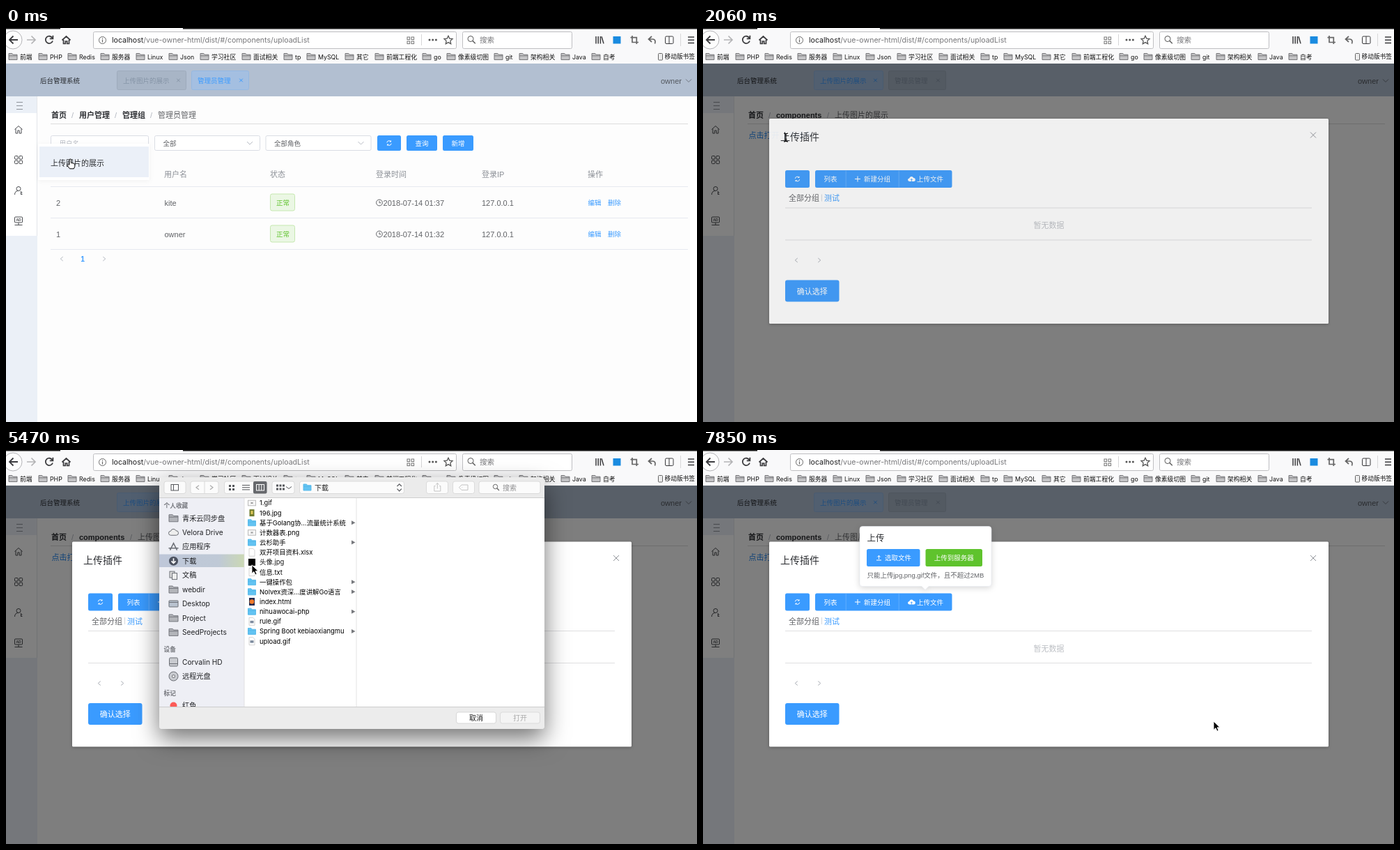
An HTML page that plays this animation: 992x565 px, repeating every 8000 ms.

```html
<!DOCTYPE html>
<html lang="zh-CN">
<head>
<meta charset="utf-8">
<title>后台管理系统</title>
<style>
  html, body { margin: 0; width: 100%; height: 100%; overflow: hidden; background: #fdfdfd; }
  svg { display: block; }
  text { white-space: pre; }
  .page { font-family: "Liberation Sans", "Noto Sans CJK SC", "Noto Sans CJK", sans-serif; }
  .ui { font-family: Inter, "Noto Sans CJK SC", "Noto Sans CJK", sans-serif; }
  #sheetBack { filter: drop-shadow(0 14px 17px rgba(0, 0, 0, .55)); }
  #dialogBack { filter: drop-shadow(0 1px 2px rgba(0, 0, 0, .3)); }
  #popBack { filter: drop-shadow(0 2px 4px rgba(0, 0, 0, .16)); }
  #menuBack { filter: drop-shadow(0 1px 3px rgba(0, 0, 0, .05)); }
</style>
</head>
<body>
<svg id="stage" width="992" height="565" viewBox="0 0 992 565"></svg>
<script>
const LOOP = 8000, BLUE = '#3a9bff', HOVER = '#66b1ff', GREEN = '#5fc32d';
const $ = id => document.getElementById(id);

// Drawing helpers; y of a text is its middle line.
const R = (x, y, w, h, fill, r = 0, stroke = 'none', extra = '') =>
  `<rect x="${x}" y="${y}" width="${w}" height="${h}" rx="${r}" fill="${fill}" stroke="${stroke}" ${extra}/>`;
const C = (x, y, r, fill, stroke = 'none') => `<circle cx="${x}" cy="${y}" r="${r}" fill="${fill}" stroke="${stroke}"/>`;
const P = (d, stroke = '#555', w = 1, fill = 'none', extra = '') =>
  `<path d="${d}" stroke="${stroke}" stroke-width="${w}" fill="${fill}" ${extra}/>`;
const T = (x, y, s, size = 11, fill = '#606266', weight = 400, anchor = 'start') =>
  `<text x="${x}" y="${y + size * .37}" font-size="${size}" fill="${fill}" font-weight="${weight}" text-anchor="${anchor}">${s}</text>`;
const G = (id, body, attr = '') => `<g id="${id}" ${attr}>${body}</g>`;
const at = (x, y, body) => `<g transform="translate(${x} ${y})">${body}</g>`;
const line = (x1, x2, y, c) => P(`M${x1} ${y}H${x2}`, c);
const cross = (x, y, r, c) => P(`M${x - r} ${y - r}l${2 * r} ${2 * r}m0 ${-2 * r}l${-2 * r} ${2 * r}`, c);
const chevron = (x, y, dx, dy, c, w = 1) => dx
  ? P(`M${x - dx / 2} ${y - 3}l${dx} 3l${-dx} 3`, c, w)
  : P(`M${x - 4} ${y - dy / 2}l4 ${dy}l4 ${-dy}`, c, w);
const refresh = (x, y, c, r = 3.2, w = 1) =>
  P(`M${x - r} ${y - .6}a${r} ${r} 0 0 1 ${1.8 * r} -1.4v-1.6m0 1.6h-1.8M${x + r} ${y + .6}a${r} ${r} 0 0 1 ${-1.8 * r} 1.4v1.6m0 -1.6h1.8`, c, w);
const magnifier = (x, y, r, c) => C(x, y, r, 'none', c) + P(`M${x + r * .7} ${y + r * .7}l${r} ${r}`, c, 1.3);
const folder = (x, y, w, h, fill, stroke) =>
  P(`M${x} ${y + h}v${-h}h${w * .4}l1.5 1.7h${w * .6 - 1.5}v${h - 1.7}zM${x} ${y + 3.4}h${w}`, stroke, .9, fill);

function browser() {
  const ink = '#3c3c3f';
  const marks = [[4, '前端'], [47, 'PHP'], [89, 'Redis'], [136, '服务器'], [187, 'Linux'], [234, 'Json'], [279, '学习社区'],
    [339, '面试相关'], [399, 'tp'], [432, 'MySQL'], [487, '其它'], [530, '前端工程化'], [598, 'go'], [633, '像素级切图'],
    [701, 'git'], [737, '架构相关'], [797, 'Java'], [841, '自考']];
  return R(0, 0, 992, 51, '#f9f9fa') + R(0, 0, 78, 1.5, '#111') + R(254, 0, 738, 1.5, '#111') +
    C(10, 17, 13, '#fdfdfd', '#b5b5b8') + P('M17 17H5m5.5-5.5L5 17l5.5 5.5', ink, 1.8) +
    P('M30 17h12m-5.5-5.5L42 17l-5.5 5.5', '#b4b4b6', 1.7) +
    P('M66.5 14.2A5.2 5.2 0 1 0 67 18.5M67.4 10.8v4.6h-4.6', ink, 1.8) +
    P('M80.5 17.5l6-5.5 6 5.5M82.5 17v5.5h2.8v-3.5h2.4v3.5h2.8V17', ink, 1.7) +
    R(125.5, 5.5, 521, 24, '#fff', 2, '#bfbfc2') + C(138.5, 17.5, 5, 'none', '#666') + P('M138.5 16.5v4m0-6.2v1.3', '#666', 1.2) +
    T(152, 17.5, 'localhost<tspan fill="#77777a">/vue-owner-html/dist/#/components/uploadList</tspan>', 10.6, '#1c1c1e') +
    [[576, 13], [582, 13], [576, 19], [582, 19]].map(p => R(...p, 3.6, 3.6, 'none', 0, '#777')).join('') +
    P('M596.5 9v16', '#d5d5d7') + [608, 612.7, 617.4].map(x => C(x, 17, 1.5, '#555')).join('') +
    P('M635 11.2l1.8 3.9 4.2.5-3.1 2.9.8 4.2-3.7-2.1-3.7 2.1.8-4.2-3.1-2.9 4.2-.5z', '#555', 1.3) +
    R(655.5, 5.5, 157, 24, '#fff', 2, '#bfbfc2') + magnifier(667, 15.5, 4, '#555') + T(680, 17.5, '搜索', 10.6, '#77777a') +
    P('M847 12v10.5m3.2-10.5v10.5m3.2-10.5v10.5M855 12.2l3 10.2', ink, 1.5) + R(871.5, 12, 11, 10.5, '#1a8be0') +
    P('M899 11v9.5h9M896.5 13.7h8.8V23', '#666', 1.7) + P('M927 12l-4.5 4 4.5 4m-4.5-4h6c4 0 4 4 3 6.5', '#666', 1.7) +
    R(946.5, 12, 11.5, 10.5, 'none', 1.5, ink) + P('M952 12v10.5', ink) + P('M968.5 8v18', '#d8d8da') +
    P('M979 13h9m-9 4.3h9m-9 4.3h9', ink, 1.5) +
    marks.map(([x, s]) => folder(x, 36.5, 12, 9, '#c4c4c6', '#6c6c70') + T(x + 16, 41.3, s, 8.8, '#111')).join('') +
    R(936.5, 36.5, 6, 9.5, '#eee', 1, '#666') + T(945.5, 41, '移动版书签', 8.7, '#111');
}

function tab(x, w, s, on) {
  const c = on ? BLUE : '#8594a6';
  return R(x + .5, 61.5, w, 27, on ? '#a4bfe1' : '#a8b5c6', 2, on ? '#94b8e2' : '#9eabbc') +
    T(x + 9, 75, s, 9.5, c) + cross(x + w - 10.5, 75, 2.3, c);
}

function frame() {
  const ink = '#4a4c50';
  const tabs = on => tab(159, 99, '上传图片的展示', on) + tab(266, 82, '管理员管理', !on);
  return R(0, 51, 992, 47, '#b2bfd1') + T(49, 75, '后台管理系统', 9.5, '#25282c') +
    G('tabsOld', tabs(false)) + G('tabsNew', tabs(true)) +
    T(940, 75.5, 'owner', 11, '#53585f') + chevron(980, 75.5, 0, 4, '#6f7680') +
    R(0, 98, 45, 467, '#ebf0f7') + R(0, 122, 44, 176, '#fff') + P('M44.5 98v200', '#e3e6ea') +
    P('M15 106.5h9m-9 5h9m-9 5h9', '#8d9299') +
    P('M12.5 145.5l5.5-5 5.5 5M14 144.5v6.5h2.8v-4h2.4v4h2.8v-6.5', ink) +
    [[12.5, 183.5], [19, 183.5], [12.5, 190], [19, 190]].map(p => R(...p, 4.6, 4.6, 'none', 1, ink)).join('') +
    C(18, 230.5, 3, 'none', ink) + P('M12.5 239c0-3.5 2.2-5.5 5-5.5M21.5 234v5m0-3h2m-2 2.5h2', ink) +
    R(12.5, 271, 11, 8, 'none', 1, ink) + T(18, 275, 'AD', 5, ink, 700, 'middle') + P('M18 279v3.5m-5.5 0h11', ink);
}

function crumbs(list) {
  return list.map(([x, s], i) => {
    const last = i === list.length - 1;
    return T(x, 124.5, s, 11, last ? '#606266' : '#2d2f33', last ? 400 : 700) +
      (last ? '' : T(list[i + 1][0] - 11, 124.5, '/', 11, '#b0b5be'));
  }).join('') + line(64, 979, 137.5, '#dcdcdc');
}

function userPage() {
  const field = (x, w, s, c, arrow) => R(x + .5, 154.5, w, 21, '#fff', 2, '#dadde4') + T(x + 12.5, 165.5, s, 9.5, c) +
    (arrow ? chevron(x + w - 14, 165, 0, 4, '#b7bbc4') : '');
  const button = (x, w, s) => R(x, 154, w, 22, BLUE, 2.5) + T(x + w / 2, 165.5, s, 9.5, '#fff', 500, 'middle');
  const row = (y, id, name, time) => T(72, y, id) + T(227.5, y, name) +
    R(379.5, y - 12.5, 35, 24, '#ebf7e4', 2.5, '#c6e8b0') + T(388, y, '正常', 9.5, GREEN) +
    C(536, y, 4.4, 'none', '#606266') + P(`M536 ${y - 2.6}v2.8h2.4`, '#606266') + T(541.5, y, time, 11.1) +
    T(683, y, '127.0.0.1') + T(835.5, y, '编辑', 9.5, BLUE, 500) + T(864, y, '删除', 9.5, BLUE, 500) +
    line(64, 979, y + 22, '#e6e9f0');
  return crumbs([[65, '首页'], [105, '用户管理'], [167, '管理组'], [218, '管理员管理']]) +
    field(64, 140, '用户名', '#b4b8c0') + field(213, 151, '全部', '#606266', 1) + field(372.5, 151, '全部角色', '#606266', 1) +
    button(533, 34, '') + refresh(550, 165, '#fff') + button(575, 44, '查询') + button(627, 44, '新增') +
    [[72, 'ID'], [227, '用户名'], [379, '状态'], [531, '登录时间'], [683, '登录IP'], [835, '操作']]
      .map(([x, s]) => T(x, 209.5, s, 11, '#8c9097', 500)).join('') + line(64, 979, 227.5, '#e6e9f0') +
    row(250.5, '2', 'kite', '2018-07-14 01:37') + row(295.5, '1', 'owner', '2018-07-14 01:32') +
    chevron(80, 331, -3.5, 0, '#b4b8c0') + T(110, 331, '1', 10.3, BLUE, 700, 'middle') + chevron(141, 331, 3.5, 0, '#b4b8c0');
}

const uploadPage = () => crumbs([[65, '首页'], [105, 'components'], [189, '上传图片的展示']]) +
  T(65.5, 154, '点击打开 上传插件', 11, '#1d84f0');

const menu = () => G('menuBack', R(46, 166, 160, 52, '#fff', 1)) + R(48, 170, 157, 44, '#ebf0f8') +
  T(64, 193.5, '上传图片的展示', 11, '#2d2f33');

function dialog() {
  const mid = (x, s) => T(x, 218, s, 9.5, '#fff', 500);
  return G('dialogBack', R(95, 131.5, 803, 294, '#fff', 1.5)) + T(111, 157.5, '上传插件', 14, '#2d2f33') + cross(876, 155, 4, '#8f9399') +
    R(118, 205.5, 35, 25, BLUE, 2.5) + refresh(135.5, 218, '#fff') + R(161, 205.5, 196.5, 25, BLUE, 2.5) +
    R(281, 205.5, 76.5, 25, HOVER, 2.5, 'none', 'id="uploadHover"') +
    P('M205.2 206v24M281.2 206v24', '#6ab3ff', .8) +
    mid(173.5, '列表') + P('M218 218h8m-4-4v8', '#fff') + mid(231, '新建分组') +
    P('M296.5 221.5a2.3 2.3 0 0 1-.3-4.6 3.2 3.2 0 0 1 6-.4 2.5 2.5 0 0 1 .3 5z', 'none', 0, '#fff') +
    P('M299.4 221.5v-3.6m-1.5 1.4l1.5-1.5 1.5 1.5', BLUE, .9) + mid(307, '上传文件') +
    T(123, 245.5, '全部分组') + P('M170.5 240v10', '#d5d8dd') + T(174, 245.5, '测试', 11, BLUE) +
    line(118, 874, 259.5, '#dfdfe1') + line(118, 874, 305.5, '#dfdfe1') + T(496.5, 284.5, '暂无数据', 11, '#bcbfc4', 400, 'middle') +
    chevron(134, 334.5, -3.5, 0, '#a9adb4') + chevron(167, 334.5, 3.5, 0, '#a9adb4') +
    R(118, 363, 77.5, 31, BLUE, 3) + T(156.7, 379, '确认选择', 11, '#fff', 500, 'middle');
}

const popover = () =>
  G('popBack', P('M229 109.5H410a4 4 0 0 1 4 4V191.500a4 4 0 0 1-4 4H324l-5 5-5-5H229a4 4 0 0 1-4-4V113.500a4 4 0 0 1 4-4z', '#e6e9f0', .6, '#fff')) +
  T(235.5, 126.5, '上传', 12.4, '#2d2f33') + R(235, 142, 76.5, 25, BLUE, 2.5) +
  R(235, 142, 76.5, 25, HOVER, 2.5, 'none', 'id="pickHover"') +
  P('M252.500 156.500v-5m-2.200 2l2.200-2.200 2.200 2.200M249 158h7', '#fff') + T(261, 154.5, '选取文件', 9.5, '#fff', 500) +
  R(319.5, 142, 81.500, 25, GREEN, 2.5) + T(360.3, 154.5, '上传到服务器', 9.5, '#fff', 500, 'middle') +
  T(235.5, 179, '只能上传jpg,png,gif文件，且不超过2MB', 9.5);

function sideIcon(x, y, kind) {
  const c = '#6b6e75';
  if (kind === 'folder') return folder(x - 6.5, y - 5, 13, 10, '#b3b5ba', c);
  if (kind === 'cloud') return P(`M${x - 4} ${y + 4}a3 3 0 0 1 0-6 4 4 0 0 1 7.500-.5 3.200 3.200 0 0 1 .5 6.500z`, c, 1, '#eee');
  if (kind === 'apps') return P(`M${x - 5} ${y + 5}l5-10 5 10M${x - 7} ${y + 2}h14`, c, 1.5);
  if (kind === 'down') return C(x, y, 6.5, '#4c5260') + P(`M${x} ${y - 4}v7m-3-2.800l3 3 3-3`, '#fff', 1.600);
  if (kind === 'docs') return R(x - 5.500, y - 5.5, 7, 9, '#ddd', 0, c) + R(x - 2, y - 3, 7, 9, '#eee', 0, c);
  if (kind === 'disk') return R(x - 6, y - 6, 12, 12, '#c9cbd0', 1.5, c) + line(x - 6, x + 6, y + 2.500, c);
  if (kind === 'disc') return C(x, y, 6.5, '#c9cbd0', c) + C(x, y, 2, '#eee', c);
  return R(x - 6.500, y - 4.500, 13, 9, '#b9c3d0', .5, c) + line(x - 6.500, x + 6.500, y - 2, c);
}

function fileIcon(y, kind) {
  const x = 353;
  if (kind === 'dir') return folder(x - 5.5, y - 4.500, 11, 9, '#62c3f2', '#54b7e8');
  if (kind === 'black') return R(x - 5, y - 5, 10, 10, '#000');
  if (kind === 'photo') return R(x - 3.500, y - 5, 7, 10, '#6f7a2c') + R(x - 1.5, y - 3, 3, 5, '#e0c95a');
  if (kind === 'web') return R(x - 4, y - 5.500, 8, 11, '#222a50') + C(x, y, 3.3, '#f07a2a');
  if (kind === 'wide') return R(x - 5.5, y - 3.800, 11, 7.600, '#f5f5f5', 0, '#bbb') + R(x - 1.500, y - 1, 3, 2, '#999');
  return P(`M${x - 4} ${y - 5.500}h5.500l2.500 2.500v8.500h-8z`, '#c8c8c8', .8, '#fff') +
    (kind === 'gif' ? R(x - 2.500, y - 1, 5, 3.500, '#7d8b9e') : '');
}

function sheet() {
  const side = [['青禾云同步盘', 'folder'], ['Velora Drive', 'cloud'], ['应用程序', 'apps'], ['下载', 'down'], ['文稿', 'docs'],
    ['webdir', 'folder'], ['Desktop', 'desk'], ['Project', 'folder'], ['SeedProjects', 'folder']];
  const files = [['1.gif', 'wide'], ['196.jpg', 'photo'], ['基于Golang协…流量统计系统', 'dir'], ['计数器表.png', 'wide'],
    ['云杉助手', 'dir'], ['双开项目资料.xlsx', 'doc'], ['头像.jpg', 'black'], ['信息.txt', 'doc'], ['一键操作包', 'dir'],
    ['Nolvex资深…度讲解Go语言', 'dir'], ['index.html', 'web'], ['nihuawocai-php', 'dir'], ['rule.gif', 'gif'],
    ['Spring Boot kebiaoxiangmu', 'dir'], ['upload.gif', 'gif']];
  const head = (y, s) => T(226.500, y, s, 8.700, '#74767c', 600);
  const entry = (y, s, kind) => sideIcon(240.5, y, kind) + T(253, y, s, 10.2, '#1f2023');
  const key = (x, w, fill = '#fbfbfb') => R(x, 45, w, 17.500, fill, 3, '#d0d0d0', 'stroke-width=".7"');
  const tools = c => P('M616.500 51.500h-1.700v7.500h9v-7.500h-1.700M619.300 55.500v-8m-2.300 2.200l2.300-2.300 2.300 2.300', c) +
    P('M650.500 53.700l3.500-3.700h9v7.400h-9zM654.500 53.700h.8', c);
  const facts = [['创建时间', '2017年12月9日 星期六 22:58'], ['修改时间', '2017年12月9日 星期六 22:58'],
    ['上次打开时间', '2017年12月9日 星期六 22:58'], ['尺寸', '385 × 385']];
  const rowY = i => 76 + 14.15 * i;
  const dark = '#55575b';
  return `<defs><linearGradient id="pick"><stop stop-color="#bec7d9"/><stop offset=".7" stop-color="#bfc9d6"/><stop offset="1" stop-color="#cbd8b4"/></linearGradient></defs>` +
    G('sheetBack', R(220, 39, 553, 361, '#ebebeb', 4)) +
    key(227, 31) + R(237, 49.5, 10.500, 8.500, 'none', 0, dark) + P('M240.500 49.500v8.500', dark) +
    key(265, 40) + P('M285 45v17.500', '#d8d8d8') + chevron(275, 53.7, -4, 0, '#aaa', 1.2) + chevron(295, 53.700, 4, 0, '#aaa', 1.2) +
    key(313.5, 61) + R(355, 45, 19.500, 17.500, '#66686c', 2) +
    [320, 325].map(x => [50, 55].map(y => R(x, y, 3, 3, dark)).join('')).join('') +
    P('M339 50.500h11m-11 3.200h11m-11 3.200h11', dark) + R(359.500, 49.500, 11, 8.500, 'none', 0, '#fff') + P('M363.200 49.500v8.500m3.600-8.500v8.500', '#fff') +
    key(382, 32) + [388, 392.500, 397].map(x => R(x, 49.500, 3, 3, dark) + R(x, 54.500, 3, 3, dark)).join('') + chevron(406, 54, 0, 3, dark) +
    key(421.5, 150) + folder(427, 49, 11, 9, '#62c3f2', '#54b7e8') + T(443, 54, '下载', 10, '#222') +
    P('M561.500 52l3.200-3.200 3.200 3.200m0 3.600l-3.200 3.200-3.200-3.200', dark, 1.200) +
    key(603.5, 31) + key(641.5, 31) + G('toolsOff', tools('#c3c3c3')) + G('toolsOn', tools(dark)) +
    key(679, 88) + magnifier(702.500, 52.500, 3.200, '#666') + T(713, 54, '搜索', 10, '#8c8c8e') +
    R(220, 68, 122, 300, '#eeeff5') + R(342, 68, 431, 300, '#fff') + line(220, 773, 68.500, '#cfcfcf') +
    R(220, 149.500, 122, 18.500, 'url(#pick)') +
    head(79.5, '个人收藏') + side.map(([s, k], i) => entry(97.800 + 20.45 * i, s, k)).join('') +
    head(286, '设备') + entry(304, 'Corvalin HD', 'disk') + entry(324.5, '远程光盘', 'disc') +
    head(349, '标记') + C(240.5, 366.500, 5, '#fc5b57') + T(253, 366.500, '红色', 10.2, '#1f2023') +
    P('M342 68.500v300M503 68.500v300', '#dcdcdc', .8) +
    R(342, 153.8, 161, 13.700, '#0a62d8', 0, 'none', 'id="rowPick"') +
    files.map(([s, k], i) => {
      const y = rowY(i);
      return fileIcon(y, k) + `<g ${i === 6 ? 'id="picked"' : ''}>` + T(364, y, s, 9.4, 'inherit') + '</g>' +
        (k === 'dir' ? P(`M496 ${y - 3}l5.500 3-5.500 3z`, 'none', 0, '#77797d') : '');
    }).join('').replaceAll('fill="inherit"', '') +
    G('preview', R(565, 76.500, 146, 146, '#000') +
      '<g fill="#fff" font-family="Inter,\'Noto Sans CJK SC\',sans-serif" font-style="italic" font-weight="600" text-anchor="middle">' +
      '<text transform="translate(638 121) rotate(14)" font-size="23">sol</text></g>' +
      P('M625 156l4 6m10-10l-4 10m-11 3l17-3m-15 9l12-2m-13 9l23-3M633 163l1 13', '#fff', 3, 'none', 'stroke-linecap="round"') +
      T(638, 239.500, '头像.jpg', 13, '#111', 400, 'middle') + T(616, 270.500, 'JPEG 图像 – 5 KB', 8.800, '#8b8c90', 500) +
      facts.map(([a, b], i) => T(609, 284.8 + 13.4 * i, a, 9.2, '#8b8c90', 400, 'end') + T(616, 284.8 + 13.4 * i, b, 8.900, '#111', 500)).join('') +
      T(616, 338.500, '添加标记…', 9.2, '#1673e6')) +
    R(220, 368, 553, 32, '#ececec', 4) + line(220, 773, 368.500, '#cdcdcd') +
    R(646.500, 376, 57, 16, '#fff', 3, '#cacaca', 'stroke-width=".7"') + T(675, 384.500, '取消', 10, '#1a1a1a', 400, 'middle') +
    R(709.500, 376, 57, 16, '#f4f4f4', 3, '#d2d2d2', 'stroke-width=".7" id="openKey"') +
    G('openText', T(738, 384.500, '打开', 10, '', 400, 'middle').replace('fill=""', ''));
}

const cursors = () =>
  G('arrow', P('M0 0v12.500l3-2.800 2 4.600 2.200-1-2-4.400h4z', '#fff', 1, '#000')) +
  G('hand', P('M-1 8V1.200a1.300 1.300 0 0 1 2.600 0V5.500l1.800.2 1.800.5 1.600.8V10.500l-1.400 3.300H-.5L-4 9.200c-.8-1.500.8-2 1.700-1z', '#000', 1, '#fff')) +
  G('beam', P('M-3-6q3 0 3 2v8q0 2-3 2M3-6q-3 0-3 2v8q0 2 3 2M-1.500 2.500h3', '#000', 1.200));

$('stage').innerHTML = R(0, 0, 992, 565, '#fdfdfd') +
  G('base', frame() + G('oldPage', userPage()) + G('newPage', uploadPage()) + G('menu', menu()), 'class="page"') +
  G('chrome', browser(), 'class="ui"') + R(0, 51, 992, 514, '#000', 0, 'none', 'id="shade"') +
  G('dialog', dialog(), 'class="page"') + G('pop', popover(), 'class="page"') +
  G('sheet', sheet(), 'class="ui"') + G('cursor', cursors());

// Opacity of each part as held steps: [time, value].
const steps = {
  tabsOld: [[0, 1], [140, 0]],
  tabsNew: [[0, 0], [140, 1]],
  menu: [[0, 1], [140, .45], [350, 0]],
  oldPage: [[0, 1], [650, .6], [800, .2], [950, 0]],
  newPage: [[0, 0], [950, .3], [1100, .8], [1250, 1]],
  shade: [[0, 0], [1910, .3], [2060, .5]],
  dialog: [[0, 0], [1910, .35], [2060, .89], [2300, 1]],
  uploadHover: [[0, 0], [2940, .5], [3090, 1], [3680, 0]],
  pop: [[0, 0], [3380, .4], [3530, .9], [3680, 1]],
  pickHover: [[0, 0], [4430, 1], [4870, 0]],
  sheet: [[0, 0], [4720, .35], [4870, .85], [5020, 1], [7700, .4], [7850, 0]],
  rowPick: [[0, 0], [5770, 1]],
  toolsOff: [[0, 1], [5770, 0]],
  toolsOn: [[0, 0], [5770, 1]],
  preview: [[0, 0], [5920, 1]],
  hand: [[0, 1], [650, 0], [3090, 1], [3680, 0]],
  beam: [[0, 0], [1910, 1], [2300, 0]],
  arrow: [[0, 0], [650, 1], [1910, 0], [2300, 1], [3090, 0], [3680, 1]]
};
const dialogY = [[0, -20], [1910, -11], [2060, -1.5], [2300, 0]];

// Pointer moves: start, end, number of steps, goal.
const start = [92, 188];
const moves = [[650, 1610, 7, 119, 157], [2300, 2800, 4, 318, 218], [3680, 4260, 5, 273, 164],
  [5320, 5620, 3, 372, 165], [6510, 6660, 2, 643, 326], [6960, 7110, 2, 733, 389]];

const held = (list, t) => list.reduce((v, [s, n]) => t >= s ? n : v, list[0][1]);

function pointer(t) {
  let [x, y] = start;
  for (const [a, b, n, gx, gy] of moves) {
    if (t < a) break;
    const k = Math.min(n, Math.floor((t - a) / (b - a) * (n - 1) + 1e-6) + 1);
    const p = 1 - (1 - k / n) ** 1.5;
    x += (gx - x) * p;
    y += (gy - y) * p;
  }
  return `translate(${x} ${y})`;
}

function draw(t) {
  for (const id in steps) {
    const v = held(steps[id], t);
    $(id).setAttribute('opacity', v);
    $(id).setAttribute('visibility', v ? 'visible' : 'hidden');
  }
  $('dialog').setAttribute('transform', `translate(0 ${held(dialogY, t)})`);
  $('cursor').setAttribute('transform', pointer(t));
  $('picked').setAttribute('fill', t >= 5770 ? '#fff' : '#111');
  $('openText').setAttribute('fill', t >= 5770 ? '#1a1a1a' : '#aaa');
  $('openKey').setAttribute('fill', t >= 7410 ? '#e4e4e4' : '#f4f4f4');
}

// A visible child would show through a hidden parent, so nested parts wait for theirs.
const nested = { uploadHover: 'dialog', pickHover: 'pop', rowPick: 'sheet', toolsOff: 'sheet', toolsOn: 'sheet', preview: 'sheet' };
function settle() {
  for (const id in nested) {
    if ($(nested[id]).getAttribute('visibility') === 'hidden') $(id).setAttribute('visibility', 'hidden');
  }
}

const origin = performance.now();
function tick() {
  draw((performance.now() - origin) % LOOP);
  settle();
  requestAnimationFrame(tick);
}
tick();
</script>
</body>
</html>
```
